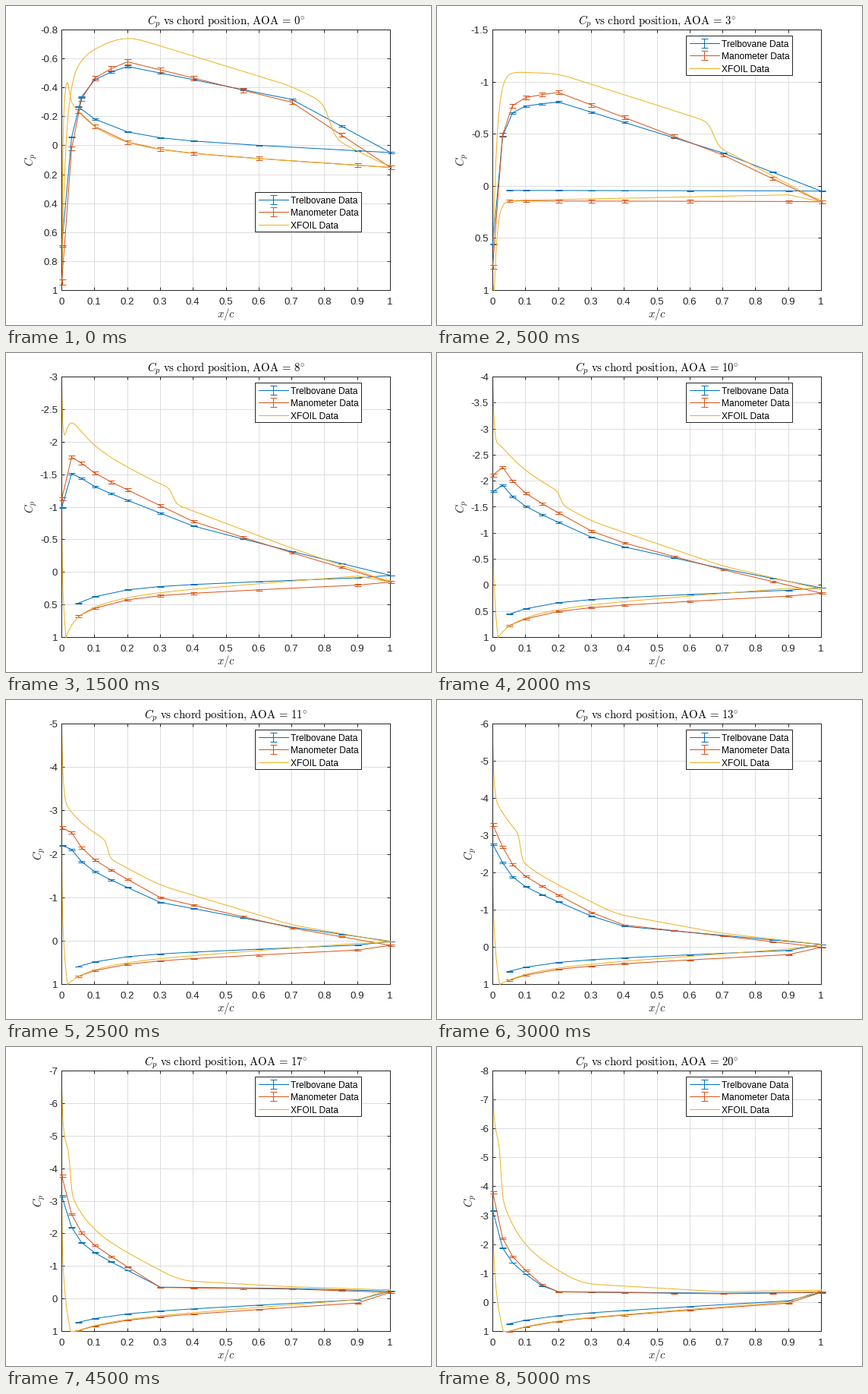
These frames come from a looping animation (560x420 px, 5.5 s). A matplotlib script:

```python
import matplotlib.pyplot as plt
import numpy as np
from matplotlib.animation import FuncAnimation
from matplotlib.patches import Rectangle

W, H, DPI = 560, 420, 100
PX = 72 / DPI  # points per pixel
BLUE, ORANGE, YELLOW, INK = "#0072BD", "#D95319", "#EDB120", "#262626"
LEFT, RIGHT, TOP, BOTTOM = 73, 506, 31, 374

plt.rcParams.update({"font.family": "Liberation Sans", "mathtext.fontset": "cm"})

# angle of attack -> upper end of the reversed Cp axis
RUNS = {0: -0.8, 3: -1.5, 5: -2, 8: -3, 10: -4, 11: -5,
        13: -6, 15: -7, 16: -7, 17: -7, 20: -8}

# pressure taps along the upper and the lower side
UPPER = np.array([0, .03, .06, .1, .15, .2, .3, .4, .55, .7, .85, 1])
LOWER = np.array([.9, .6, .4, .3, .2, .1, .05])

# shape parameters, keyed by angle and interpolated in between
KEY_ANGLES = [0, 3, 8, 11, 15, 17, 20]
KEYS = {
    "ramp": [-.4, -.82, -1.75, -2.26, -2.41, -2.25, -2.05],
    "tip": [.943, .774, -1.13, -2.61, -3.98, -3.78, -3.8],
    "knee_x": [.2, .2, .4, .3, .43, .3, .175],
    "knee_cp": [-.58, -.9, -.78, -1, -.26, -.35, -.37],
    "panel_x": [.2, .2, .3, .3, .45, .36, .27],
    "panel_cp": [-.54, -.86, -1.13, -1.28, -.5, -.56, -.65],
    "bubble": [.815, .672, .338, .14, .028, .026, .025],
    "nose": [.3, 0, -.7, -.5, -1.6, -1.7, -2.8],
    "dip": [1.25, 1.9, 1.5, 0, .5, .5, .8],
}


def key(name, angle):
    return np.interp(angle, KEY_ANGLES, KEYS[name])


def trailing_edge(angle, onset):
    return .15 - .05 * max(angle - onset, 0)


def lower_side(x, angle):
    level = .75 * np.sin(np.pi * angle / 40) ** 1.15
    slope = .15 - .048 * angle
    front = .47 * np.tanh((angle - 3) / 2.3)
    return level + slope * x + front * np.exp(-x / .1)


def manometer(angle):
    ramp = key("ramp", angle)
    tip = key("tip", angle) - ramp
    bend = 22 - 65 * np.sin(np.pi * angle / 24)
    upper = np.interp(UPPER, [0, key("knee_x", angle), .7, 1],
                      [ramp, key("knee_cp", angle), -.3, trailing_edge(angle, 10)])
    upper += (tip + bend * UPPER) * np.exp(-UPPER / .02)
    return np.r_[upper, lower_side(LOWER, angle)]


def panel_upper(x, angle):
    """Rounded ramp, a step at the separation bubble and the nose peak."""
    knots = [0, key("panel_x", angle), .7, 1]
    values = [1.08 * key("ramp", angle), key("panel_cp", angle),
              -.37 + .18 * np.exp(-angle / 1.2), trailing_edge(angle, 8.5)]
    spread = np.linspace(-.04, .04, 9)[:, None]
    base = np.interp(x + spread, knots, values).mean(axis=0)
    at = key("bubble", angle)
    step = .22 + .15 * max(angle - 10, 0)
    gate = (1 + np.tanh((at - x) / (.005 + .018 * at))) / 2
    spike = -1.6 * np.clip((angle - 3) / 5, 0, 1)
    return (base - step * gate + key("nose", angle) * np.exp(-x / .05)
            + key("dip", angle) * np.exp(-x / .012) + spike * np.exp(-x / .004))


def panel_lower(x, stag, angle):
    def side(s):
        return lower_side(s, angle) - .17 * np.sin(np.pi * angle / 22) * s

    rise = max(1 - side(stag), 0) * np.exp(-(x - stag) / (.003 + .002 * angle))
    suction = .1 * max(1 - angle / 3, 0) * np.exp(-((x - .017) / .008) ** 2)
    close = (trailing_edge(angle, 8.5) - side(1)) * np.clip((x - .9) / .1, 0, 1)
    return np.minimum(side(x) + rise - suction + close, 1)


def panel_curve(angle):
    """Trailing edge, upper side, nose, stagnation point, lower side."""
    q = np.linspace(0, 1, 500)
    stag = .0016 * angle
    up_x = (1 - q) ** 2
    up = panel_upper(up_x, angle)
    low_x = stag + (1 - stag) * q ** 2
    x = np.r_[up_x, stag * q ** 6, low_x]
    return x, np.r_[up, up[-1] + (1 - up[-1]) * q, panel_lower(low_x, stag, angle)]


def error_line(ax, x, y, err, color):
    bars = ax.errorbar(x, y, yerr=err, color=color, lw=PX, elinewidth=PX,
                       capsize=4.5 * PX, capthick=PX)
    for part in bars.get_children():
        part.set_clip_on(False)


def write(page, x, y, text, size, color=INK, ha="center", **kw):
    page.text(x, y, text, fontsize=size * PX, color=color, ha=ha, va="baseline", **kw)


def draw_legend(page, top):
    page.add_patch(Rectangle((328, top), 140, 52, fc="white", ec=INK, lw=PX))
    rows = [("Trelbovane Data", BLUE), ("Manometer Data", ORANGE), ("XFOIL Data", YELLOW)]
    for i, (name, color) in enumerate(rows):
        y = top + 10 + 16.4 * i
        page.plot([333, 372], [y, y], color=color, lw=PX)
        if color != YELLOW:
            error_line(page, [352.4], [y], 6, color)
        write(page, 375, y + 4.8, name, 12, "black", "left")


def chart_axes(low, shift=0):
    ax = fig.add_axes([(LEFT + shift) / W, 1 - (BOTTOM + shift) / H,
                       (RIGHT - LEFT) / W, (BOTTOM - TOP) / H])
    ax.set(xlim=(0, 1), ylim=(1, low))
    return ax


def draw(i):
    angle, low = list(RUNS.items())[i]
    span = 1 - low
    step = .2 if span < 2 else .5 if span <= 5 else 1
    xticks = np.round(np.arange(11) / 10, 1)
    yticks = np.round(np.arange(low, 1 + step / 2, step), 1) + 0.0

    fig.clear()
    frame = chart_axes(low)
    frame.set(xticks=xticks, yticks=yticks)
    frame.set_axisbelow(True)
    frame.grid(color="#DEDEDE", lw=PX)
    frame.tick_params(direction="in", length=4.3 * PX, width=PX, color=INK, top=True,
                      right=True, labelbottom=False, labelleft=False)
    for side in frame.spines.values():
        side.set(color=INK, linewidth=PX)

    # curves run through pixel centres
    data = chart_axes(low, .5)
    data.axis("off")
    taps = np.r_[UPPER, LOWER]
    mano = manometer(angle)
    scan = .815 * mano - .075
    error_line(data, taps, scan, .003 + .006 * abs(scan), BLUE)
    error_line(data, taps, mano, .012 + .007 * abs(mano), ORANGE)
    data.plot(*panel_curve(angle), color=YELLOW, lw=PX, zorder=3)

    page = fig.add_axes([0, 0, 1, 1])
    page.set(xlim=(0, W), ylim=(H, 0))
    page.axis("off")
    for v in xticks:
        write(page, LEFT + v * (RIGHT - LEFT), 393, f"{v:g}", 13.33)
    for v in yticks:
        y = TOP + (v - low) / span * (BOTTOM - TOP)
        write(page, 68, y + 5, f"{v:g}", 13.33, ha="right")
    title = (r"$C_p\ \mathrm{vs\ chord\ position}{,}\ \mathrm{AOA}\,=\,%d^{\circ}$" % angle)
    write(page, 289.8, 24, title, 14.8, "black")
    write(page, 289.8, 410, "$x/c$", 14.67)
    write(page, 37 if step < 1 else 48, 202.5, "$C_p$", 14.67,
          rotation=90, rotation_mode="anchor")
    draw_legend(page, 245 if angle == 0 else 39)
    return []


fig = plt.figure(figsize=(W / DPI, H / DPI), dpi=DPI, facecolor="white")
anim = FuncAnimation(fig, draw, frames=len(RUNS), interval=500,
                     init_func=lambda: [], repeat=True, repeat_delay=0)
plt.show()
```
